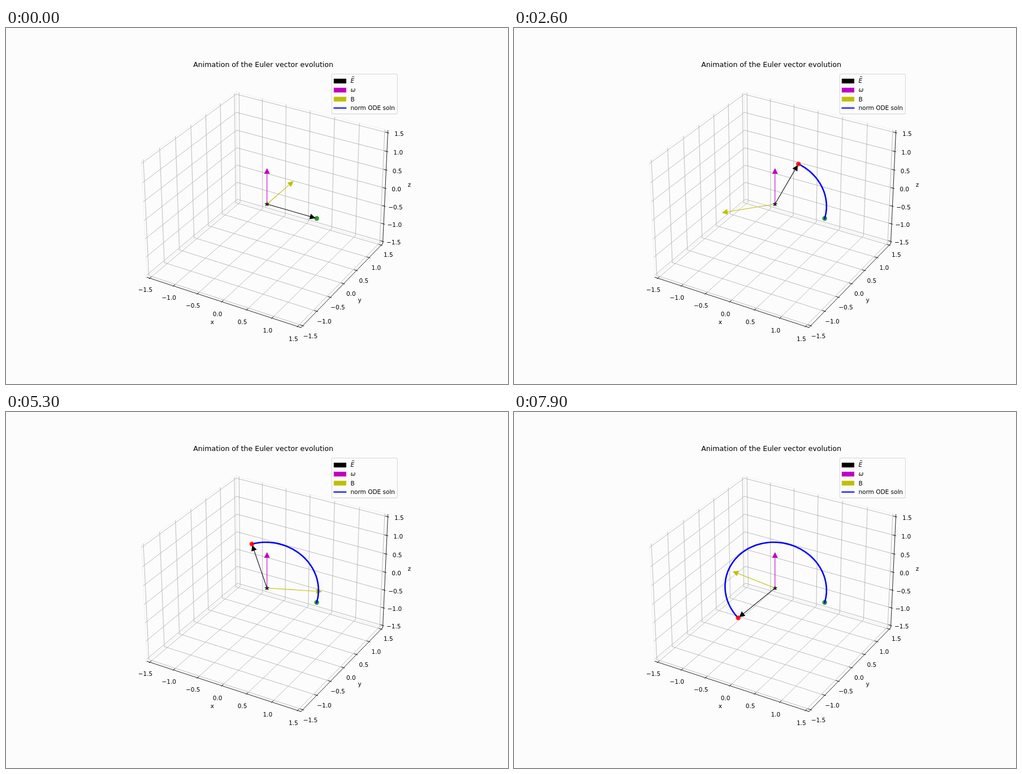
These frames come from a looping animation (888x630 px, 8000 ms). An HTML page:

```html
<!DOCTYPE html>
<html lang="en">
<head>
<meta charset="utf-8">
<title>Euler vector evolution</title>
<style>
  html, body { margin: 0; width: 100%; height: 100%; overflow: hidden; background: #fcfcfc; }
  svg { display: block; }
  text { font: 10.5px "DejaVu Sans", sans-serif; }
  .mid { text-anchor: middle; }
  .math { font-style: italic; }
</style>
</head>
<body>
<svg id="stage" width="888" height="630" viewBox="0 0 888 630"></svg>
<script>
const STEP = 100, LOOP = 8000;
const PT = 1.05;      // pixels per point
const LIM = 1.5625;   // outer edge of the box
const TICKS = [-1.5, -1, -0.5, 0, 0.5, 1, 1.5];
const BLACK = '#000', MAGENTA = '#bf00bf', OLIVE = '#bfbf00', BLUE = '#0000ff';
const stage = document.getElementById('stage');

function add(tag, attrs, text) {
  const node = document.createElementNS('http://www.w3.org/2000/svg', tag);
  set(node, attrs);
  if (text) node.textContent = text;
  return stage.appendChild(node);
}

function set(node, attrs) {
  for (const key in attrs) node.setAttribute(key, attrs[key]);
}

// Perspective view: elevation 30, azimuth -60, distance 10, box 4:4:3.
function project([x, y, z]) {
  const bx = x * 8 / 21, by = y * 8 / 21, bz = z * 2 / 7;
  const h = Math.sqrt(3) / 2;
  const scale = 2622.2 / (10 - (h / 2 * bx - 0.75 * by + 0.5 * bz));
  return [
    461.66 + scale * (h * bx + 0.5 * by),
    311.6 - scale * (-0.25 * bx + h / 2 * by + h * bz)
  ];
}

const toPath = pts => pts.length ? 'M' + pts.map(p => p[0].toFixed(2) + ' ' + p[1].toFixed(2)).join('L') : '';
const path3d = pts => toPath(pts.map(project));

function line3d(pts, stroke, extra) {
  return add('path', { d: path3d(pts), fill: 'none', stroke, 'stroke-width': 0.8 * PT, ...extra });
}

function label(str, x, y, cls = 'mid', extra) {
  return add('text', { x, y, class: cls, ...extra }, str);
}

function drawBox() {
  const a = -LIM, b = LIM;
  const panes = [
    [[a, a, a], [a, b, a], [a, b, b], [a, a, b]],
    [[a, b, a], [b, b, a], [b, b, b], [a, b, b]],
    [[a, a, a], [b, a, a], [b, b, a], [a, b, a]]
  ];
  panes.forEach(p => line3d([...p, p[0]], '#f0f0f0'));

  // For each axis: point at value v, moved outwards by d; grid path through v; tick ends
  const out = d => LIM + d;
  const axes = [
    {
      name: 'x',
      at: (v, d) => [v, -out(d), -out(d)],
      grid: v => [[v, a, a], [v, b, a], [v, b, b]],
      tick: v => [[v, a - 0.025, a], [v, a + 0.05, a]]
    },
    {
      name: 'y',
      at: (v, d) => [out(d), v, -out(d)],
      grid: v => [[b, v, a], [a, v, a], [a, v, b]],
      tick: v => [[b + 0.025, v, a], [b - 0.05, v, a]]
    },
    {
      name: 'z',
      at: (v, d) => [out(d), out(d), v],
      grid: v => [[a, a, v], [a, b, v], [b, b, v]],
      tick: v => [[b + 0.025, b, v], [b - 0.05, b, v]]
    }
  ];
  axes.forEach(ax => TICKS.forEach(v => line3d(ax.grid(v), '#b0b0b0')));
  axes.forEach(ax => {
    line3d([ax.at(a, 0), ax.at(b, 0)], BLACK, { 'stroke-linecap': 'square' });
    TICKS.forEach(v => {
      line3d(ax.tick(v), BLACK);
      const [x, y] = project(ax.at(v, 0.149));
      label(v.toFixed(1).replace('-', '\u2212'), x, y + 8.2);
    });
    const [x, y] = project(ax.at(0, 0.325));
    label(ax.name, x, y + 2.75);
  });
}

function drawLegend() {
  add('rect', { x: 576.2, y: 81.5, width: 116.2, height: 70.6, rx: 2, fill: '#fcfcfc', stroke: '#d6d6d6', 'stroke-width': PT });
  [[BLACK, 97.6], [MAGENTA, 113.6], [OLIVE, 129.6]].forEach(([color, base]) =>
    add('rect', { x: 580.3, y: base - 7.35, width: 21, height: 7.35, fill: color, stroke: color, 'stroke-width': PT }));
  add('path', { d: 'M579.3 141.6H602.3', stroke: BLUE, 'stroke-width': 2 * PT });
  label('E', 609.6, 97.4, 'math');
  add('path', { d: 'M612 87.3l1.9-2.1l1.9 2.1', fill: 'none', stroke: BLACK, 'stroke-width': 0.9 });
  label('ω', 609.6, 113.4, 'math');
  label('B', 609.6, 129.6, '');
  label('norm ODE soln', 609.4, 145.3, '');
}

function makeArrow(color) {
  const style = { stroke: color, 'stroke-width': PT, 'stroke-miterlimit': 10 };
  const shaft = add('path', { fill: 'none', ...style });
  const head = add('path', { fill: color, ...style });
  return vec => {
    const [x0, y0] = project([0, 0, 0]), [x1, y1] = project(vec);
    const len = Math.hypot(x1 - x0, y1 - y0);
    const ux = (x1 - x0) / len, uy = (y1 - y0) / len;
    const at = (along, side) => [x0 + ux * along - uy * side, y0 + uy * along + ux * side];
    const gap = 2 * PT, tip = len - gap - 1.17, base = tip - 8 * PT, half = 4 * PT;
    set(shaft, { d: toPath([at(gap, 0), at(tip, 0)]) });
    set(head, { d: toPath([at(base, half), at(tip, 0), at(base, -half)]) + 'Z' });
  };
}

function makeDot(color, opacity) {
  const dot = add('circle', { r: 4.2, fill: color, opacity });
  return vec => {
    const [cx, cy] = project(vec);
    set(dot, { cx, cy });
    return dot;
  };
}

function drawStar() {
  const [cx, cy] = project([0, 0, 0]);
  const pts = Array.from({ length: 10 }, (_, i) => {
    const r = i % 2 ? 1.42 : 3.71, a = i * Math.PI / 5;
    return [cx + r * Math.sin(a), cy - r * Math.cos(a)];
  });
  add('path', { d: toPath(pts) + 'Z', stroke: BLACK, 'stroke-width': PT, 'stroke-linejoin': 'round', opacity: 0.85 });
}

// Solver times: tiny first steps, then 0.1 each.
const solverTime = n => n < 2 ? 0.001 * n : 0.011 + 0.1 * (n - 2);

// Rotation axis of a 1 rad turn about x followed by a turn t about z
function eulerAxis(t) {
  const s = Math.sin(0.5), c = Math.cos(0.5);
  const v = [s * Math.cos(t / 2), s * Math.sin(t / 2), c * Math.sin(t / 2)];
  const norm = Math.hypot(...v);
  return v.map(k => k / norm);
}

const bodyVector = t => [-Math.sin(t), Math.cos(t), 0];

drawBox();
label('Animation of the Euler vector evolution', 455.1, 69.2, 'mid', { style: 'font-size:12.6px' });
drawStar();
makeDot('#008000', 0.82)([1, 0, 0]);
const setOmega = makeArrow(MAGENTA);
const setB = makeArrow(OLIVE);
const setE = makeArrow(BLACK);
const trail = add('path', { fill: 'none', stroke: BLUE, 'stroke-width': 2.6, 'stroke-linejoin': 'round', 'stroke-linecap': 'square' });
const setHead = makeDot('#ff0000', 0.85);
drawLegend();
setOmega([0, 0, 1]);

let shown = -1;
function render(now) {
  const n = Math.floor((now % LOOP) / STEP);
  if (n !== shown) {
    shown = n;
    const pts = Array.from({ length: n }, (_, i) => eulerAxis(solverTime(i)));
    const tip = n ? pts[n - 1] : [1, 0, 0];
    setB(bodyVector(solverTime(n)));
    setE(tip);
    set(trail, { d: n > 1 ? path3d(pts) : '' });
    set(setHead(tip), { visibility: n ? 'visible' : 'hidden' });
  }
}

const start = performance.now();
function tick() {
  render(performance.now() - start);
  requestAnimationFrame(tick);
}
tick();
</script>
</body>
</html>
```
